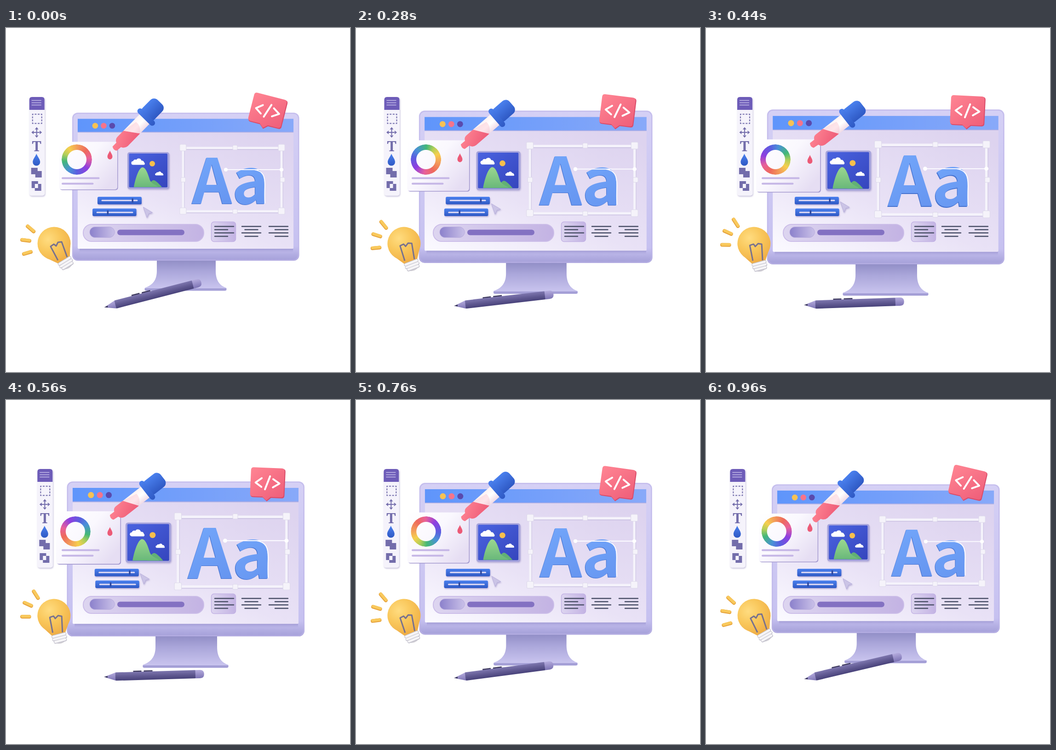
An HTML page that plays this animation: 748 by 748 pixels, repeating every 1000 ms.

```html
<!DOCTYPE html>
<html lang="en">
<head>
<meta charset="utf-8">
<title>Design tools</title>
<style>
html, body { margin: 0; width: 100%; height: 100%; overflow: hidden; background: #fff; }
svg { position: absolute; left: 0; top: 0; width: 748px; height: 748px; }
#wheel { position: absolute; left: 121px; top: 253px; width: 66px; height: 66px; border-radius: 50%;
  background: conic-gradient(#f3a05a, #ee6a5c 45deg, #e8619a 85deg, #8f3fe0 130deg, #5a5fe0 180deg, #4a90d8 215deg, #43b878 262deg, #b5cf58 295deg, #f6cf4e 325deg, #f3a05a);
  -webkit-mask: radial-gradient(circle, transparent 20.5px, #000 21.5px);
  mask: radial-gradient(circle, transparent 20.5px, #000 21.5px); }
</style>
</head>
<body>
<svg viewBox="0 0 748 748">
<defs>
  <linearGradient id="body" x2="0" y2="1"><stop stop-color="#d5d0f5"/><stop offset=".9" stop-color="#c6c1f0"/><stop offset="1" stop-color="#a49fd8"/></linearGradient>
  <linearGradient id="screen" x1="0" y1="1" x2=".7" y2="0"><stop stop-color="#fbfaff"/><stop offset=".45" stop-color="#e9e2f6"/><stop offset="1" stop-color="#ddd3ef"/></linearGradient>
  <linearGradient id="bar"><stop stop-color="#5f95fb"/><stop offset="1" stop-color="#88a9f9"/></linearGradient>
  <linearGradient id="shade" x2="0" y2="1"><stop stop-color="#938dcb"/><stop offset="1" stop-color="#c6c0ee" stop-opacity="0"/></linearGradient>
  <linearGradient id="stand" x2="0" y2="1"><stop stop-color="#8c89c2"/><stop offset=".4" stop-color="#aaa6da"/><stop offset="1" stop-color="#cdc8f1"/></linearGradient>
  <linearGradient id="card" y2=".7"><stop stop-color="#fff"/><stop offset=".5" stop-color="#faf8fe"/><stop offset="1" stop-color="#e6def3"/></linearGradient>
  <linearGradient id="blue" x2="0" y2="1"><stop stop-color="#4a80ee"/><stop offset="1" stop-color="#2f59c4"/></linearGradient>
  <linearGradient id="sky" x2="1" y2="1"><stop stop-color="#4a63e0"/><stop offset="1" stop-color="#3545bd"/></linearGradient>
  <linearGradient id="hill" x2="0" y2="1"><stop stop-color="#9bd78f"/><stop offset="1" stop-color="#69b87a"/></linearGradient>
  <linearGradient id="letter" x2=".3" y2="1"><stop stop-color="#78aeff"/><stop offset="1" stop-color="#6695f0"/></linearGradient>
  <linearGradient id="pill"><stop stop-color="#ddd5f0"/><stop offset="1" stop-color="#c3b3e3"/></linearGradient>
  <linearGradient id="knob"><stop stop-color="#8b80cb"/><stop offset="1" stop-color="#c9c0e8"/></linearGradient>
  <linearGradient id="pink" x2="1" y2="1"><stop stop-color="#ff8593"/><stop offset="1" stop-color="#ee5c78"/></linearGradient>
  <linearGradient id="pen" x2="0" y2="1"><stop stop-color="#7d76ae"/><stop offset=".5" stop-color="#625b93"/><stop offset="1" stop-color="#48427a"/></linearGradient>
  <linearGradient id="lilac" x2="0" y2="1"><stop stop-color="#b4abdd"/><stop offset="1" stop-color="#7d74b4"/></linearGradient>
  <linearGradient id="glass" x2="0" y2="1"><stop stop-color="#fff3f3"/><stop offset=".5" stop-color="#fff"/><stop offset="1" stop-color="#f1dbe6"/></linearGradient>
  <radialGradient id="bulb" cx=".32" cy=".38" r=".75"><stop stop-color="#ffdc80"/><stop offset=".5" stop-color="#f9c75b"/><stop offset="1" stop-color="#f0b048"/></radialGradient>
  <filter id="soft" x="-20%" y="-20%" width="140%" height="140%"><feDropShadow dx="1" dy="2" stdDeviation="1.5" flood-color="#6e62a8" flood-opacity=".4"/></filter>
  <path id="drop" d="M0-13C3-6 8-1 8 5A8 8 0 0 1-8 5C-8-1-3-6 0-13Z"/>
  <path id="cloud" d="M-12 5a4 4 0 0 1 0-8a5 5 0 0 1 7-3a6 6 0 0 1 11 2a5 5 0 0 1 6 4a3 3 0 0 1 0 5Z" fill="#fff"/>
</defs>

<g id="monitor">
  <path d="M328 500H456V528C456 548 464 560 479 565Q481 571 477 571H304Q300 571 302 565C319 559 328 548 328 528Z" fill="url(#stand)"/>
  <path d="M302 566H479Q480 571 476 571H305Q301 571 302 566Z" fill="#a49fd6"/>
  <rect x="144" y="184" width="493.5" height="322" rx="12" fill="url(#body)"/>
  <rect x="145.5" y="185.5" width="490.5" height="319" rx="11" fill="none" stroke="#beb6e8" stroke-width="2" opacity=".7"/>
  <rect x="160" y="479" width="464" height="12" fill="url(#shade)" opacity=".85"/>
  <rect x="156" y="197" width="469" height="283" rx="2" fill="url(#screen)"/>
  <rect x="156" y="197.5" width="469" height="28.5" fill="url(#bar)"/>
  <path d="M156 226.5H625" stroke="#a9abe4" stroke-width="1.5"/>
  <circle cx="194" cy="212.5" r="6.3" fill="#f8c254"/>
  <circle cx="212.5" cy="212.5" r="6.3" fill="#f5748b"/>
  <circle cx="231" cy="212.5" r="6.3" fill="#5a4aad"/>
</g>

<g id="controls">
  <rect x="168" y="427" width="262" height="37" rx="18" fill="url(#pill)" stroke="#cbbde8" stroke-width="2"/>
  <rect x="182" y="432.5" width="54" height="23" rx="11.5" fill="url(#knob)" stroke="#b5a9dc"/>
  <rect x="242" y="438.5" width="146" height="12" rx="6" fill="#8371c2"/>
  <rect x="446.5" y="421.5" width="53" height="43" rx="6" fill="url(#pill)" stroke="#c2b2e4" stroke-width="1.5"/>
  <g id="align" stroke="#4b5068" stroke-width="2.4" stroke-linecap="round"></g>
</g>

<g id="picture">
  <rect x="264" y="270" width="91" height="80" rx="5" fill="#a5a3dc" filter="url(#soft)"/>
  <rect x="267.5" y="273" width="83.5" height="73.5" rx="2" fill="url(#sky)"/>
  <use href="#cloud" x="288.5" y="292.5"/>
  <use href="#cloud" transform="translate(334 317.5) scale(.62)"/>
  <circle cx="318" cy="295" r="6" fill="#f7bf4c"/>
  <path d="M307 346C313 337 317 331 321 331S332 338 339 346Z" fill="#62b075"/>
  <path d="M278 346C281 328 289 303 297 303C304 303 309 318 313 331C317 340 328 341 331 346Z" fill="url(#hill)"/>
</g>

<g id="type">
  <rect x="385.5" y="262" width="214" height="137.5" fill="none" stroke="#b4acd4" stroke-width="6" opacity=".55"/>
  <rect x="385" y="261" width="214" height="137.5" fill="none" stroke="#f5f3fb" stroke-width="5"/>
  <g font-family="'Noto Sans CJK JP','Noto Sans CJK SC','Noto Sans CJK',sans-serif" font-weight="700" font-size="135" text-anchor="middle">
    <g fill="#4672cf"><text x="447" y="383">A</text><text x="530.5" y="383">a</text></g>
    <g fill="url(#letter)"><text x="448" y="382">A</text><text x="531.5" y="382">a</text></g>
  </g>
  <path d="M478 308H599M540 308C559 311 563 322 563 342Q562 366 563 381" fill="none" stroke="#fbfaff" stroke-width="2"/>
  <circle cx="478" cy="308" r="4" fill="#fff"/><circle cx="599" cy="308" r="4" fill="#fff"/>
  <g id="handles" fill="#f5f3fa" stroke="#dedaeb"></g>
</g>

<g id="slider1">
  <rect x="199" y="367" width="96" height="16.5" rx="3" fill="url(#blue)" filter="url(#soft)"/>
  <path d="M209 375H285" stroke="#e4ddf5" stroke-width="3" stroke-linecap="round"/>
  <rect x="273.5" y="370.5" width="3.5" height="9" rx="1" fill="#2c479f"/>
</g>
<g id="slider2">
  <rect x="188" y="392.5" width="95.5" height="16.5" rx="3" fill="url(#blue)" filter="url(#soft)"/>
  <path d="M198 401H275" stroke="#e4ddf5" stroke-width="3" stroke-linecap="round"/>
  <rect x="219.5" y="396.5" width="3.5" height="9" rx="1" fill="#2c479f"/>
</g>
<path id="cursor" d="M298.5 389.5L318.5 401.5L310.5 403.5L306.5 412.5Z" fill="#cbc4e6" stroke="#b7aedb" stroke-linejoin="round" filter="url(#soft)"/>

<g id="panel">
  <rect x="117" y="248.5" width="126.5" height="104" rx="5" fill="#a59bd0"/>
  <rect x="115.5" y="247.5" width="126.5" height="103.5" rx="5" fill="url(#card)"/>
</g>
<path d="M123 326.5H201.5M123 338.5H188.5" stroke="#c5b6e6" stroke-width="4" stroke-linecap="round"/>
<g id="tint"><use href="#drop" transform="translate(226 276) scale(.68 .74)" fill="#ec5a76"/></g>

<g id="dropper"><g transform="translate(236 262) rotate(-45.7)">
  <path d="M40-13H94V17H40Z" fill="url(#glass)"/>
  <path d="M0-6Q-5 1 0 7L12 8Q15 16 24 17H62L41-13H22Q15-13 12-6Z" fill="url(#pink)"/>
  <path d="M62 17L41-13L74-7Q76 6 62 17Z" fill="#f9b6c4" opacity=".35"/>
  <rect x="95" y="-18" width="46" height="36" rx="11" fill="url(#blue)"/>
  <rect x="91" y="-23" width="12" height="49" rx="6" fill="url(#blue)"/>
</g></g>

<g id="badge"><g transform="translate(569 179.5) rotate(14.4)">
  <path d="M-31-32H31Q37-32 37-26V26Q37 32 31 32H8L-1 40L-10 32H-31Q-37 32-37 26V-26Q-37-32-31-32Z" fill="#d94c6a" transform="translate(1 1)"/>
  <path d="M-31-32H30Q36-32 36-26V25Q36 31 30 31H8L-1 39L-10 31H-31Q-37 31-37 25V-26Q-37-32-31-32Z" fill="url(#pink)"/>
  <path d="M-13-9L-26 1L-13 10M5-14L-5 15M12-8L26 1L12 10" fill="none" stroke="#fff" stroke-width="4" stroke-linecap="round" stroke-linejoin="round"/>
</g></g>

<g id="toolbar">
  <rect x="51" y="150" width="33.5" height="214.5" rx="5" fill="#f5f3fb" filter="url(#soft)"/>
  <path d="M51 178V156Q51 150 57 150H78Q84 150 84 156V178Z" fill="#6d5cb8"/>
  <path d="M56 157.5H77M56 162.5H77M56 167.5H77" stroke="#c8bfea" stroke-width="1.5"/>
  <g fill="#736dab">
    <rect x="58" y="187.5" width="20" height="20" fill="none" stroke="#736dab" stroke-width="2" stroke-dasharray="4 2.667" stroke-dashoffset="2"/>
    <path d="M66 220h2v6h6v2h-6v6h-2v-6h-6v-2h6ZM67 215.5l4 5h-8ZM67 238.5l4-5h-8ZM55.5 227l5-4v8ZM78.5 227l-5-4v8Z"/>
    <text x="67" y="267.5" text-anchor="middle" font-family="'Noto Serif',serif" font-weight="700" font-size="31">T</text>
    <path d="M55 304h14v7h9v14h-14v-7h-9Z"/>
    <path fill-rule="evenodd" d="M56 333h14v6h7v15h-14v-6h-7ZM63 339h7v9h-7Z"/>
  </g>
  <use href="#drop" x="66.5" y="286.5" fill="url(#blue)"/>
</g>

<g id="lamp">
  <g transform="translate(104 468) rotate(58.5)">
    <path d="M18-31L44-14V14L18 31Z" fill="#f0b048"/>
    <path d="M57-9H61Q66 0 61 9H57Z" fill="#d5d3d8"/>
    <path d="M45-13V13M51.5-13V13M57.5-11V11" stroke="#bdbbc8" stroke-width="7" stroke-linecap="round"/>
    <path d="M45-13V13M51-13V13M57-11V11" stroke="#f6f5f7" stroke-width="5" stroke-linecap="round"/>
  </g>
  <circle cx="104.5" cy="468.5" r="36" fill="url(#bulb)"/>
  <path d="M113 505L97 475L104 470L109 474L113 466L121 465L133 498" fill="none" stroke="#77718f" stroke-width="3" stroke-linejoin="round"/>
  <g stroke-linecap="round" fill="none">
    <path d="M47 431.5L60 442.5M35 461L51 463M39 491.5L54 487" stroke="#e5a13a" stroke-width="8"/>
    <path d="M47 430.5L60 441.5M35 460L51 462M39 490.5L54 486" stroke="#f9c95c" stroke-width="6"/>
  </g>
</g>

<g id="stylus"><g transform="translate(213.5 607.5) rotate(-14.6)">
  <path d="M64-10H82M87-10H106" stroke="#403c60" stroke-width="3"/>
  <path d="M4-1L26-9V9L4 1.5Z" fill="url(#lilac)"/>
  <path d="M0 0L8-2V2Z" fill="#37345a"/>
  <rect x="25" y="-9" width="175" height="18" rx="2" fill="url(#pen)"/>
  <path d="M199-9H209Q218-9 218 0T209 9H199Z" fill="url(#lilac)"/>
</g></g>
</svg>
<div id="wheel"></div>

<script>
const el = id => document.getElementById(id);
const set = (id, value) => el(id).setAttribute('transform', value);
const move = (id, x, y) => set(id, `translate(${x} ${y})`);
const turn = (id, angle, x, y) => set(id, `rotate(${angle} ${x} ${y})`);
const zoom = (id, s, x, y) => set(id, `translate(${x} ${y}) scale(${s}) translate(${-x} ${-y})`);

const rows = [431.5, 438.5, 445.5, 453];
el('align').innerHTML = [454, 513, 572].map((x, side) => rows.map((y, i) => {
  const gap = i % 2 ? 13 : 0, left = x + gap * side / 2;
  return `<path d="M${left} ${y}h${41 - gap}"/>`;
}).join('')).join('');

const square = (x, y, size) =>
  `<rect x="${x - size / 2}" y="${y - size / 2}" width="${size}" height="${size}" rx="2"/>`;
el('handles').innerHTML =
  [[385, 260], [599, 260], [385, 398], [599, 398]].map(p => square(...p, 14)).join('') +
  [[498, 260], [498, 399], [385.5, 330], [601, 330]].map(p => square(...p, 10)).join('');

function draw(now) {
  const t = Math.floor(now % 1000 / 40) * 40;
  const away = Math.abs(t - 505);
  const q = 1 - Math.min(away, 1000 - away) / 500;  // linear there and back

  zoom('monitor', 1 + .053 * q, 391, 335);
  zoom('picture', 1 + .1 * q, 309, 310);
  zoom('type', 1 + .116 * q, 493, 328);
  zoom('panel', 1 + .116 * q, 180, 300);
  move('slider1', -7 * q, 0);
  move('slider2', 7 * q, 0);
  move('cursor', -7.5 * q, -13.5 * q);
  move('tint', 0, 11 * q);
  move('toolbar', 20 * q - .5, 0);
  turn('dropper', 8.7 * q, 286, 211);
  turn('badge', -13.4 * q, 569, 181);
  turn('lamp', 19.4 * q, 104, 468);
  turn('stylus', 14.5 * q, 237, 602);
  el('wheel').style.transform = `translateX(${-3.5 * q}px) rotate(${t * .36}deg)`;
  requestAnimationFrame(draw);
}
requestAnimationFrame(draw);
</script>
</body>
</html>
```
